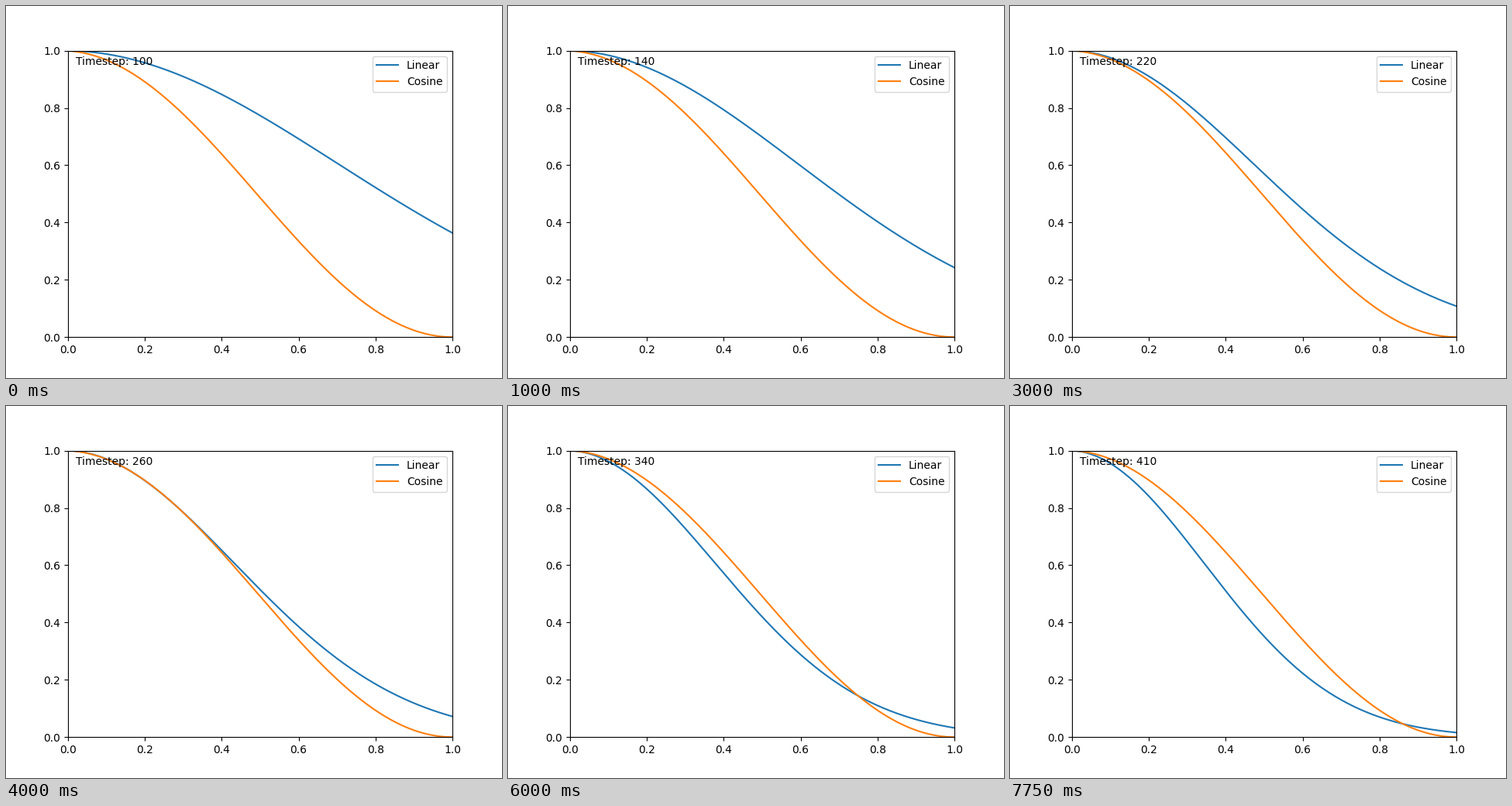
A matplotlib script that plays this animation: 640x480 px, repeating every 8000 ms.

```python
import numpy as np
import matplotlib.pyplot as plt
from matplotlib.animation import FuncAnimation

FRAMES = 32
INTERVAL = 250  # ms
FIRST_STEP, STEP_GAIN = 100, 10


def linear_schedule(steps):
    betas = np.linspace(1e-4, 0.02, steps)
    return np.cumprod(1 - betas)


def cosine_schedule(steps, offset=0.008):
    t = np.linspace(0, 1, steps + 1)
    f = np.cos((t + offset) / (1 + offset) * np.pi / 2) ** 2
    betas = np.clip(1 - f[1:] / f[:-1], 0, 0.999)
    return np.cumprod(1 - betas)


fig, ax = plt.subplots(figsize=(6.4, 4.8), dpi=100)
ax.set_xlim(0, 1)
ax.set_ylim(0, 1)
linear_line, = ax.plot([], [], label="Linear")
cosine_line, = ax.plot([], [], label="Cosine")
label = ax.text(0.02, 0.95, "", transform=ax.transAxes)
ax.legend(loc="upper right")


def update(frame):
    steps = FIRST_STEP + STEP_GAIN * frame
    x = np.linspace(0, 1, steps)
    linear_line.set_data(x, linear_schedule(steps))
    cosine_line.set_data(x, cosine_schedule(steps))
    label.set_text(f"Timestep: {steps}")
    return linear_line, cosine_line, label


anim = FuncAnimation(fig, update, frames=FRAMES, interval=INTERVAL,
                     repeat=True, repeat_delay=0)
plt.show()
```
